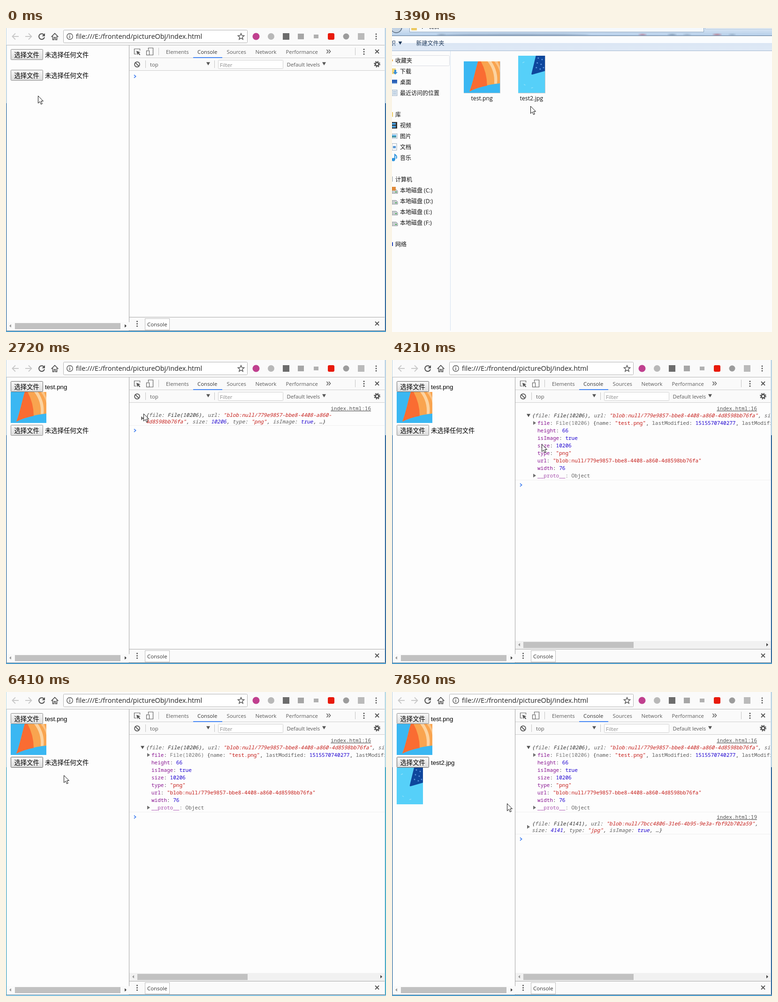
These frames come from a looping animation (810x647 px, 7.99 s). An HTML page:

```html
<!DOCTYPE html>
<html lang="zh-CN">
<head>
<meta charset="utf-8">
<title>File picker preview</title>
<style>
html, body { margin: 0; width: 100%; height: 100%; overflow: hidden; background: #fdfdfd; }
svg { display: block; }
text { white-space: pre; }
.ui { font-family: "Open Sans", "Noto Sans CJK SC", "Noto Sans CJK", sans-serif; }
.page { font-family: "Liberation Sans", "Noto Sans CJK SC", "Noto Sans CJK", sans-serif; font-size: 13.33px; }
.mono { font-family: "Noto Sans Mono", "Liberation Mono", monospace; font-size: 11px; fill: #303030; }
.it { font-style: italic; }
.str { fill: #c41a16; }
.num { fill: #1c00cf; }
.key { fill: #881391; }
.dim { fill: #5c5c5c; }
.obj { fill: #777; }
</style>
</head>
<body>
<svg id="stage" width="810" height="647" viewBox="0 0 810 647"></svg>
<script>
const LOOP = 7990;
const T = { open1: 970, close1: 2210, expand: 3300, focus2: 5980, blur: 6410, open2: 6560, close2: 7400 };

const rect = (x, y, w, h, fill, more = '') =>
  `<rect x="${x}" y="${y}" width="${w}" height="${h}" fill="${fill}" ${more}/>`;
const path = (d, fill, stroke = 'none', w = 1, more = '') =>
  `<path d="${d}" fill="${fill}" stroke="${stroke}" stroke-width="${w}" ${more}/>`;
const line = (d, color, w = 1) => path(d, 'none', color, w);
const disc = (x, y, r, fill, stroke = 'none', w = 1, more = '') =>
  `<circle cx="${x}" cy="${y}" r="${r}" fill="${fill}" stroke="${stroke}" stroke-width="${w}" ${more}/>`;
const label = (x, y, s, size = 11.3, fill = '#5a5a5a') =>
  `<text class="ui" x="${x}" y="${y}" font-size="${size}" fill="${fill}">${s}</text>`;
const pageText = (x, y, s) => `<text class="page" x="${x}" y="${y}">${s}</text>`;
const group = (id, body) => `<g id="${id}">${body}</g>`;
const dots = (x, y) => [-5, 0, 5].map(d => disc(x, y + d, 1.5, '#555')).join('');
const cross = (x, y) => line(`M${x - 4} ${y - 4}l8 8m0 -8l-8 8`, '#555', 1.8);
const down = (x, y, w = 4, fill = '#555') => path(`M${x - w} ${y - w * .8}h${2 * w}l${-w} ${w * 1.7}z`, fill);
const right = (x, y) => path(`M${x - 3} ${y - 4}v8l6 -4z`, '#6e6e6e');

// Colours a console line: strings, objects, keys, numbers.
function code(x, y, s, italic = true) {
  const rule = /(^\w+"|"[^"]*"?)|(File\(\d+\))|(\w+)(?=: )|\b(\d+|true)\b/g;
  const body = s.replace(rule, (m, str, obj, key, num, at) => {
    const kind = str ? 'str' : num ? 'num' : obj ? (italic ? '' : 'obj') : !italic && at === 0 ? 'key' : 'dim';
    return `<tspan class="${kind}">${m}</tspan>`;
  });
  return `<text class="mono ${italic ? 'it' : ''}" x="${x}" y="${y}">${body}</text>`;
}
const link = (y, s) =>
  `<text class="mono" x="778" y="${y}" text-anchor="end" text-decoration="underline" style="fill:#545454">${s}</text>`;

function button(y, id) {
  return rect(10.5, y + .5, 68, 22, 'url(#btn)', `id="${id}" stroke="#8c8c8c" rx="1"`) + pageText(17.5, y + 17, '选择文件');
}

function scrollbar(x, y, w, from, to, track) {
  const mid = y + 8;
  return rect(x, y, w, 17, track) + rect(from, y + 2, to - from, 13, '#c1c1c1') +
    path(`M${x + 10} ${mid - 3.5}v7l-4 -3.5z`, '#9a9a9a') +
    path(`M${x + w - 10} ${mid - 3.5}v7l4 -3.5z`, '#404040');
}

function star(cx, cy, r) {
  const pts = [...Array(10)].map((_, i) => {
    const a = i * Math.PI / 5 - Math.PI / 2, q = i % 2 ? r * .45 : r;
    return `${(cx + q * Math.cos(a)).toFixed(1)} ${(cy + q * Math.sin(a)).toFixed(1)}`;
  });
  return line(`M${pts.join('L')}z`, '#555', 1.4);
}

const defs = `<defs>
  <linearGradient id="btn" x2="0" y2="1"><stop stop-color="#f8f8f8"/><stop offset="1" stop-color="#dcdcdc"/></linearGradient>
  <linearGradient id="glass" x2="0" y2="1"><stop stop-color="#dbe8f5"/><stop offset="1" stop-color="#b3cde9"/></linearGradient>
  <linearGradient id="bar" x2="0" y2="1"><stop stop-color="#dbe6f4"/><stop offset="1" stop-color="#dfe9f6"/></linearGradient>
  <filter id="soft"><feGaussianBlur stdDeviation="3 1.2"/></filter>
  <symbol id="pic1" viewBox="0 0 76 66" preserveAspectRatio="none">
    ${rect(0, 0, 76, 66, '#3ab7f2')}
    ${path('M12 63C19 46 25 16 30 0H76V46Q38 50 12 63Z', '#f9a44f')}
    ${path('M12 63C19 46 25 16 30 0H36Q49 24 49 51Q28 55 12 63Z', '#fa6c32')}
    ${path('M50 0Q66 20 64 47L70 46.5Q73 22 58 0Z', '#fcd3a0')}
    ${path('M64 0Q74 12 76 24V12L71 0Z', '#fbc486')}
  </symbol>
  <symbol id="pic2" viewBox="0 0 56 78" preserveAspectRatio="none">
    ${rect(0, 0, 56, 78, '#56d0f9')}
    ${path('M37 0H56V32L30 39.5Q27 40 28 37Z', '#0e469c')}
    ${[[42, 5], [50, 8], [40, 15], [48, 18], [38, 25], [46, 28], [53, 25]].map(([x, y]) => disc(x, y, 1.5, '#5b93dc')).join('')}
    ${line('M9 15l4 -2M12 60l3 2M27 68l4 -1', '#8be0fb', 1.5)}
  </symbol>
</defs>`;
const pic = (n, x, y, w, h) => `<use href="#pic${n}" x="${x}" y="${y}" width="${w}" height="${h}"/>`;

function toolbar() {
  const gray = '#c9c9c9', ink = '#505050';
  return rect(0, 0, 810, 36, '#fafafa') + line('M0 36.5H810', '#b8b8b8') +
    line('M27 18H14M20 11.5L13.5 18L20 24.5', gray, 1.8) + line('M41 18H54M48 11.5L54.5 18L48 24.5', gray, 1.8) +
    line('M80.5 14A6 6 0 1 0 82 19.5', ink, 2) + path('M83 11v6.5h-6.5z', ink) +
    line('M96.5 19L104 11.5L111.5 19M99.5 17V25H102.5V20H105.5V25H108.5V17', ink, 1.6) +
    rect(122.5, 4.5, 392, 27, '#fff', 'stroke="#b4b4b4" rx="2"') +
    disc(136, 18, 6.2, 'none', '#5a5a5a', 1.4) + rect(135.2, 17, 1.6, 4.6, '#5a5a5a') + rect(135.2, 14.2, 1.6, 1.6, '#5a5a5a') +
    label(149, 23, 'file:///E:/frontend/pictureObj/index.html', 14.45, '#222') + star(501, 18.5, 7) +
    disc(533, 18, 7.5, '#c0408f') + disc(565, 18, 7, '#b8b8b8') + rect(590, 11, 14, 14, '#6c6c6c') +
    rect(622, 12, 13, 12, '#a6a6a6') + rect(656, 14, 10, 8, '#b0b0b0') + rect(686, 11, 14, 14, '#e81a0c', 'rx="3"') +
    disc(725, 18, 6.5, '#9c9c9c') + rect(750, 11, 14, 14, '#bababa') + dots(789, 18);
}

function devtools() {
  const tabs = [[341, 'Elements'], [408, 'Console', '#333'], [470.5, 'Sources'], [531.5, 'Network'], [596.5, 'Performance']];
  return rect(263, 37, 544, 53, '#fafafa') + line('M263 63.5H807M263 90.5H807', '#cfcfcf') +
    line('M325.5 42V58M744.5 42V58M297.5 69V85M444.5 69V85', '#c4c4c4') +
    line('M278 55.5H273.5V44.5H285.5V48', '#666', 1.2) + path('M278 48.5l8.5 3.2l-3.4 1.4l3.2 3.4l-1.4 1.4l-3.3 -3.4l-1.6 3.2z', '#555') +
    line('M303.5 47V42.5H313.5V57.5H306', '#666', 1.2) + rect(299.5, 48.5, 6, 9, '#fafafa', 'stroke="#666" stroke-width="1.2"') +
    tabs.map(([x, s, c]) => label(x, 55, s, 11.3, c)).join('') + rect(399, 62, 62, 2, '#4a8af4') +
    line('M683.5 46l3.5 4l-3.5 4M688 46l3.5 4l-3.5 4', '#555', 1.4) + dots(763, 50.5) + cross(791, 50) +
    disc(279.5, 77.5, 5.4, 'none', '#555', 1.8) + line('M275.7 73.7l7.6 7.6', '#555', 1.8) +
    label(307, 82, 'top') + down(431, 76) +
    rect(452.5, 68.5, 138, 18, '#fff', 'stroke="#cfcfcf" rx="1"') + label(456, 82.5, 'Filter', 11.3, '#8a8a8a') +
    label(598.5, 82, 'Default levels') + down(678, 76) +
    disc(791, 77, 5.6, 'none', '#555', 2.6, 'stroke-dasharray="2.2 2.2"') + disc(791, 77, 3.6, 'none', '#555', 2.6) +
    rect(263, 616, 544, 27, '#fafafa') + line('M263 615.5H807', '#a9a9a9') + line('M263 643.5H807', '#cfcfcf') + dots(279.5, 629.5) +
    rect(296.5, 618.5, 52, 24, '#fff', 'stroke="#bdbdbd"') + label(301, 635, 'Console', 11.4, '#333') + cross(791, 629);
}

function logs() {
  const url = '"blob:null/779e9857-bbe8-4408-a860-4d8598bb76fa"';
  const rows = ['file: File(10206) {name: "test.png", lastModified: 1515570740277, lastModifiedDate: ',
    'height: 66', 'isImage: true', 'size: 10206', 'type: "png"', `url: ${url}`, 'width: 76', '__proto__: Object'];
  const rule = y => line(`M263 ${y}.5H807`, '#f0f0f0');
  return group('link1', link(107, 'index.html:16')) +
    group('short', right(291, 124) + code(298, 121, '{file: File(10206), url: "blob:null/779e9857-bbe8-4408-a860-') +
      code(298, 135, '4d8598bb76fa", size: 10206, type: "png", isImage: true, …}') + rule(139)) +
    group('full', down(291, 118) + code(298, 122, `{file: File(10206), url: ${url}, size: 10206`) +
      rows.map((s, i) => `<g opacity="${s[0] === '_' ? .75 : 1}">${code(310, 138 + 16 * i, s, false)}</g>`).join('') +
      right(304, 134) + right(304, 246) + rule(255) + scrollbar(263, 598, 545, 280, 515, '#f1f1f1')) +
    group('log2', link(270, 'index.html:19') + right(291, 287) +
      code(298, 284, '{file: File(4141), url: "blob:null/7bcc4806-31e6-4b95-9e3a-fbf92b702a59",') +
      code(298, 298, 'size: 4141, type: "jpg", isImage: true, …}') + rule(302)) +
    group('prompt', line('M273 -3.2l3.6 3.2l-3.6 3.2', '#3879f0', 1.6));
}

const edges = (id, top, side, foot) => group(id,
  rect(0, 0, 1, 160, top) + rect(0, 160, 1, 487, side) + rect(1, 37, 1, 608, '#c9dbe8') +
  rect(808, 0, 2, 160, top) + rect(808, 160, 2, 487, side) + rect(807, 0, 1, 645, '#d5e2ec') +
  rect(0, 644, 810, 1, '#6f8494') + rect(0, 645, 810, 2, foot));

function browser() {
  return rect(0, 0, 810, 647, '#fdfdfd') + toolbar() + devtools() + logs() +
    line('M262.5 37V644', '#a3a3a3') + scrollbar(1, 626, 262, 19, 244, '#fafafa') +
    button(45, 'btn1') + group('none1', pageText(83, 62, '未选择任何文件')) +
    group('got1', pageText(83, 62, 'test.png') + pic(1, 10, 68, 76, 66)) +
    group('row2', button(89, 'btn2') + group('none2', pageText(83, 106, '未选择任何文件')) +
      group('got2', pageText(83, 106, 'test2.jpg') + pic(2, 10, 112, 56, 78))) +
    edges('active', '#b9d2e4', '#2b6499', '#4da3d6') + edges('inactive', '#b5dbe4', '#3fa9c4', '#8fd0ee');
}

const icons = {
  fav: y => path(`M0 ${y - 3}l2 3l-2 3z`, '#f0a030'),
  load: y => rect(0, y - 6, 8, 12, '#f3d77c') + path(`M5 ${y - 3}h4v5h3l-5 5l-5 -5h3z`, '#3a8fd6'),
  desk: y => rect(0, y - 5, 11, 9, '#2c62b8') + rect(0, y + 2, 11, 2, '#9dbfe6'),
  recent: y => rect(0, y - 6, 11, 12, '#dfe8f0', 'stroke="#9fb2c4"') + line(`M2 ${y - 2}h7M2 ${y + 2}h7`, '#7fa3c8'),
  lib: y => rect(0, y - 5, 2, 10, '#efcf70'),
  film: y => rect(0, y - 7, 11, 14, '#333') + rect(0, y - 5, 8, 4, '#4b9edb') + rect(0, y + 1, 8, 4, '#4b9edb'),
  image: y => rect(0, y - 5, 11, 10, '#f4f8fb', 'stroke="#9aa9b8"') + rect(0, y - 3, 9, 3, '#6db9ea') + rect(0, y, 9, 3, '#3d8f9c'),
  doc: y => rect(0, y - 7, 10, 14, '#fff', 'stroke="#9aa9b8"') + rect(2, y - 2, 6, 5, '#5f9bd5'),
  note: y => disc(3, y + 4, 3.5, '#2b93dd') + line(`M6 ${y + 4}V${y - 7}Q12 ${y - 3} 9 ${y + 2}`, '#2b93dd', 2),
  pc: y => rect(0, y - 6, 1.5, 11, '#a9b3bd'),
  disk: y => path(`M0 ${y - 1}h9l3 3v5H0z`, '#c9cdd1', '#8d9399') + rect(7, y + 3, 3, 2, '#3fae4c'),
  sys: y => icons.disk(y) + rect(0, y - 7, 8, 8, '#e08a3a'),
  net: y => rect(0, y - 4, 2, 8, '#2f4fc0')
};

function dialog() {
  const side = [[69, 'fav', '收藏夹'], [92, 'load', '下载'], [115, 'desk', '桌面'], [138, 'recent', '最近访问的位置'],
    [184, 'lib', '库'], [207, 'film', '视频'], [230, 'image', '图片'], [253, 'doc', '文档'], [276, 'note', '音乐'],
    [322, 'pc', '计算机'], [345, 'sys', '本地磁盘 (C:)'], [368, 'disk', '本地磁盘 (D:)'], [391, 'disk', '本地磁盘 (E:)'],
    [414, 'disk', '本地磁盘 (F:)'], [460, 'net', '网络']];
  const roots = ['fav', 'lib', 'pc', 'net'];
  const smear = [[260, 160, '#7d93ac'], [105, 8, '#8496aa'], [534, 7, '#b0566c'], [597, 8, '#687f99'], [629, 7, '#8ba0b8'], [693, 8, '#b04a58'], [725, 6, '#7f95ad']];
  return rect(0, 0, 810, 647, '#fcfcfc') + rect(0, 0, 810, 17, 'url(#glass)') +
    smear.map(([x, w, c]) => `<ellipse cx="${x}" cy="14" rx="${w}" ry="2" fill="${c}" opacity=".55" filter="url(#soft)"/>`).join('') +
    rect(37.5, -5, 627, 13.5, '#f5f9fd', 'stroke="#8fa6be"') + rect(667.5, -5, 150, 7, '#f5f9fd', 'stroke="#a9bdd2"') +
    disc(9, -2, 12, '#c3d3e4', '#56677a', 1.6) + rect(41, -4, 12, 9, '#edcb66', 'rx="1"') +
    path('M64 -3v5l3 -3z', '#333') + label(79, 2, 'test', 12, '#111') +
    rect(0, 16, 810, 1, '#5f7893') + rect(0, 17, 810, 15, '#fafcfe') + rect(0, 32, 810, 16, 'url(#bar)') + rect(0, 48, 810, 1, '#a3b9d1') +
    label(-4, 37, '织', 12, '#1e395b') + down(17.5, 32, 4, '#1e395b') + label(51.5, 37, '新建文件夹', 12, '#1e395b') +
    rect(-5, 58.5, 127.5, 22, '#fdfdfd', 'stroke="#d9dce2" rx="2"') + line('M124.5 49V644', '#d6e3f1') +
    side.map(([y, icon, s]) => icons[icon](y) + label(roots.includes(icon) ? 7 : 17, y + 4.5, s, 12, '#111')).join('') +
    rect(153, 71, 78, 68, '#c9cdd0') + pic(1, 153, 71, 77, 67) + label(168.5, 154, 'test.png', 12.2, '#111') +
    rect(269, 59, 58, 80, '#c9cdd0') + pic(2, 269, 59, 57, 79) + label(272.5, 154, 'test2.jpg', 12.4, '#111');
}

const stage = document.getElementById('stage');
stage.innerHTML = defs + browser() + group('dialog', dialog()) +
  group('cursor', path('M.5 .5V16L4.2 12.6L6.6 18.3L9.2 17.2L6.8 11.6H11.4Z', '#fff', '#111'));

// Pointer stops: time, x, y, number of jumps on the way (0 = wait, then jump).
const stops = [
  [0, 68, 144, 0], [120, 62, 112, 0], [420, 42, 40, 2], [540, 38, 52, 1],
  [970, 90, 90, 0], [1390, 295, 166, 3], [1900, 196, 112, 4],
  [2210, 212, 112, 0], [2720, 293, 114, 4], [2990, 288, 119, 2],
  [3300, 288, 120, 0], [3600, 288, 151, 2], [3910, 302, 154, 0], [4210, 319, 179, 2], [4840, 319, 254, 5],
  [4960, 304, 238, 0], [5110, 288, 221, 1],
  [5420, 250, 200, 0], [5980, 40, 148, 4], [6410, 123, 177, 3],
  [6560, 178, 187, 0], [6710, 233, 196, 1], [7130, 296, 108, 3], [7400, 296, 108, 0], [7540, 276, 158, 1],
  [7690, 262, 198, 0], [7850, 245, 237, 1]
];

function pointer(t) {
  let i = stops.length - 1;
  while (stops[i][0] > t) i--;
  const [t0, x0, y0] = stops[i], next = stops[i + 1];
  if (!next || !next[3]) return [x0, y0];
  const [t1, x1, y1, n] = next;
  const k = Math.floor((t - t0) / (t1 - t0) * n + .03) / n;
  return [Math.round(x0 + (x1 - x0) * k), Math.round(y0 + (y1 - y0) * k)];
}

const el = id => document.getElementById(id);
const show = (id, on) => el(id).setAttribute('visibility', on ? 'inherit' : 'hidden');
const move = (id, x, y) => el(id).setAttribute('transform', `translate(${x} ${y})`);

function draw(t) {
  const one = t >= T.close1, full = t >= T.expand, two = t >= T.close2;
  const away = t >= T.blur && !two;
  show('dialog', t >= T.open1 && !one || t >= T.open2 && !two);
  show('none1', !one); show('got1', one); show('link1', one);
  show('short', one && !full); show('full', full);
  show('none2', !two); show('got2', two); show('log2', two);
  show('active', !away); show('inactive', away);
  el('btn1').setAttribute('stroke', t >= 540 && t < T.focus2 ? '#6c6c6c' : '#8c8c8c');
  el('btn2').setAttribute('stroke', t >= T.focus2 ? '#5c5c5c' : '#8c8c8c');
  move('row2', 0, one ? 49 : 0);
  move('prompt', 0, two ? 313 : full ? 266 : one ? 150 : 103);
  move('cursor', ...pointer(t));
}

const start = performance.now();
function tick() {
  draw((performance.now() - start) % LOOP);
  requestAnimationFrame(tick);
}
tick();
</script>
</body>
</html>
```
